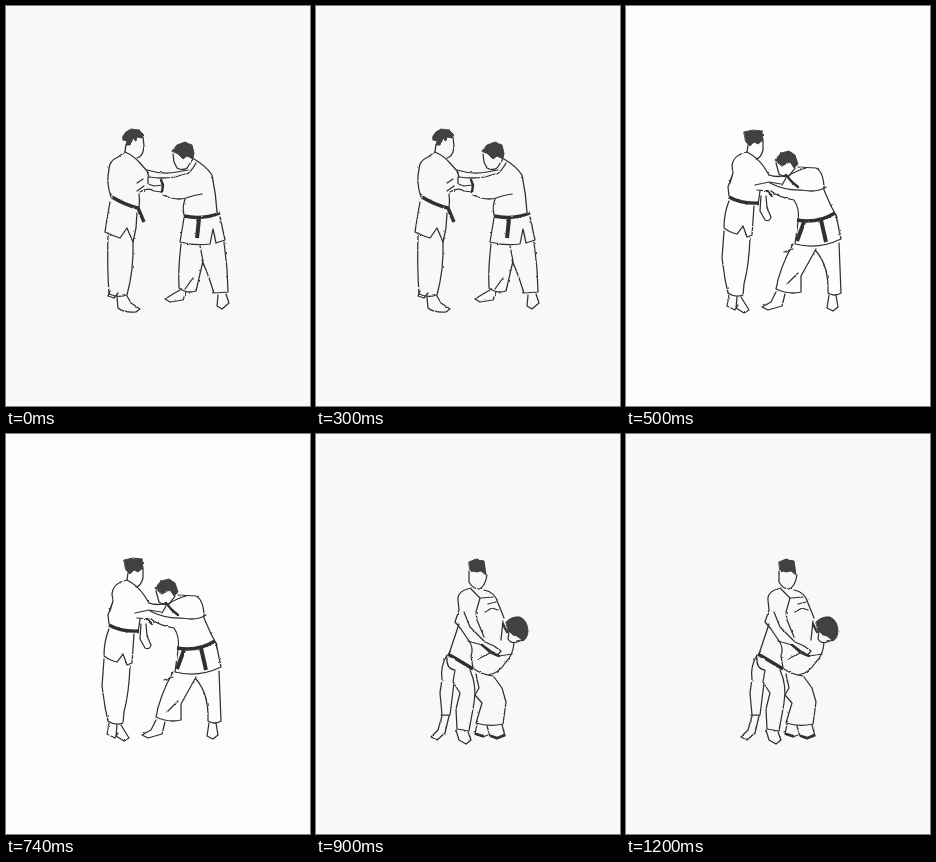
These frames come from a looping animation (304 px wide and 400 px high, 1.4 s). An HTML page:

```html
<!DOCTYPE html>
<html lang="en">
<head>
<meta charset="utf-8">
<title>Judo throw entry</title>
<style>
  html, body { margin: 0; width: 100%; height: 100%; overflow: hidden; background: #f8f8f8; }
  svg { display: block; width: 100%; height: 100%; }
  path { fill: none; stroke: #303030; stroke-width: 1.25; stroke-linecap: round; stroke-linejoin: round; }
  .hair { fill: #414141; stroke-width: .8; }
  .belt { stroke-width: 3.4; stroke-linecap: butt; }
  .knot { stroke-width: 4; stroke-linecap: butt; }
  .cuff { stroke-width: 2.4; }
  .ink { filter: url(#rough); }
  .pose { visibility: hidden; }
</style>
</head>
<body>
<svg viewBox="0 0 304 400">
  <!-- Slightly uneven pen line -->
  <filter id="rough" filterUnits="userSpaceOnUse" width="304" height="400" color-interpolation-filters="sRGB">
    <feTurbulence type="fractalNoise" baseFrequency=".22" numOctaves="2" seed="4"/>
    <feDisplacementMap in="SourceGraphic" scale="2" xChannelSelector="R" yChannelSelector="G"/>
  </filter>

  <!-- Grip -->
  <g class="pose">
    <rect width="304" height="400" fill="#f8f8f8"/>
    <g class="ink">
      <!-- left fighter -->
      <path class="hair" d="M117 130L120 126 125 123 133 124 137 128 136 132 131 131 130 135 127 133 124 139 120 139 121 135 117 134Z"/>
      <path d="M137 131L138 140 137 146Q135 151 131 152M120 139L119 146"/>
      <path d="M119 146L112 151Q103 155 103 163Q100 177 105 191M119 146Q128 150 134 157L141 165 143 171"/>
      <path d="M131 177L137 173M131 185L138 180M133 188Q134 195 133 202"/>
      <path class="belt" d="M106 191Q119 199 132 202L138 216"/>
      <path d="M104 196Q101 212 99 226Q107 230 114 232L121 222 127 236 130 222 131 207"/>
      <path d="M102 229Q101 260 103 288M127 236Q128 263 121 289M103 288Q112 292 121 289"/>
      <path d="M104 285L102 290 108 292 112 287M111 291L112 302Q118 307 130 306L134 303 125 297 121 290"/>
      <!-- arms -->
      <path d="M141 164Q157 169 171 166L182 164M143 171Q156 173 169 171L179 168"/>
      <path d="M142 171L142 178 148 180M134 186Q142 181 148 185L156 186M148 180L157 179M157 189Q170 195 180 192Q188 189 196 188"/>
      <path class="cuff" d="M155 174L157 179 156 186"/>
      <!-- right fighter -->
      <path class="hair" d="M166 145L171 139 179 136 186 139 188 147 187 153 181 150 177 153 172 148Z"/>
      <path d="M167 148L168 156 171 162Q177 165 181 162L187 153"/>
      <path d="M188 153Q200 160 206 169Q210 188 211 206M190 157Q185 166 181 168M179 193Q176 202 178 209"/>
      <path class="belt" d="M178 210Q196 214 214 207"/>
      <path class="knot" d="M193 213L191 232"/>
      <path d="M178 212L174 236Q189 240 204 238L207 223 210 237 219 234 214 211"/>
      <path d="M175 238Q172 263 173 282Q181 288 190 285L197 255 194 240M196 254Q203 270 208 287L222 286 221 263 218 236M179 283L187 272"/>
      <path d="M174 284L167 288 159 293 164 296 177 294 180 286M212 289L211 300 216 303 223 297 220 288"/>
    </g>
  </g>

  <!-- Step in -->
  <g class="pose">
    <rect width="304" height="400" fill="#fdfdfd"/>
    <g class="ink">
      <!-- left fighter -->
      <path class="hair" d="M118 126L127 124 136 125 137 134 132 138 128 136 124 140 120 136Z"/>
      <path d="M137 134L137 144Q135 152 130 153M122 139L121 146"/>
      <path d="M121 146Q107 149 106 160L107 167 102 181 103 190M121 146Q132 152 138 161L143 169M107 167L104 177"/>
      <path d="M129 179L143 176 155 178M131 184L143 185M134 185L132 199"/>
      <path class="belt" d="M103 191Q115 198 133 197"/>
      <path d="M103 195Q98 207 98 222Q105 227 111 228L117 220 121 231 126 229 128 200"/>
      <path d="M98 225L96 252 99 273 102 287M124 232Q123 259 118 278L117 289Q109 292 102 287"/>
      <path d="M103 289L101 300 109 304 112 299M111 291L110 302 118 307 123 304 115 291"/>
      <path d="M135 190L134 205 139 214Q144 216 145 211L141 202 140 190"/>
      <!-- right fighter -->
      <path class="hair" d="M149 154L155 147 163 145 169 149 172 158 168 162 164 156 156 160Z"/>
      <path d="M150 157L153 168Q158 172 163 170L169 162"/>
      <path d="M172 161L190 162Q198 166 198 184L205 200 211 211M162 170Q172 164 180 162"/>
      <path d="M143 169Q151 172 160 169M144 177Q160 185 176 184Q191 187 200 181M145 185Q152 191 168 194Q174 203 172 214M156 179L160 172"/>
      <path class="cuff" d="M160 169L166 176 172 181M141 185L146 190"/>
      <path class="belt" d="M171 214Q191 218 209 207"/>
      <path class="knot" d="M178 216L171 235M195 214L200 236"/>
      <path d="M172 216L169 238Q192 244 215 233L210 209"/>
      <path d="M167 238Q154 261 150 283Q163 289 175 286L175 270 190 243M190 245Q203 260 202 287Q209 291 215 287L213 237M158 246L167 243M161 278L172 267"/>
      <path d="M150 286L145 296 136 301 142 304 156 300 159 288M203 289L201 302 207 305 212 301 210 289"/>
    </g>
  </g>

  <!-- Hip entry -->
  <g class="pose">
    <rect width="304" height="400" fill="#f8f8f8"/>
    <g class="ink">
      <!-- upright fighter -->
      <path class="hair" d="M153 128L160 125 168 127 169 133 170 141 165 137 160 138 154 136Z"/>
      <path d="M153 137L153 148Q157 155 163 155Q169 153 171 141"/>
      <path d="M155 154Q141 157 142 166L143 176 139 188 145 195 153 207M168 156Q179 158 182 169L188 184"/>
      <path d="M155 155L164 164 160 178 161 186 168 203M165 164L177 163M169 178L176 174 182 176M172 170L180 168M148 178L154 193 168 207"/>
      <path d="M143 190L138 205 133 220M153 207Q158 214 155 222L157 234M152 207L166 211"/>
      <path class="belt" d="M132 220Q144 227 157 235"/>
      <path d="M131 221Q124 233 126 245L124 259 126 281M131 223Q130 235 139 236L137 248 144 259 140 275 141 295M154 236Q161 251 158 269L153 297 141 295M138 249L134 281 125 281"/>
      <path d="M126 282L122 296 115 303 121 306 129 299 133 282M140 296L143 306 150 310 155 306 152 298"/>
      <!-- bent fighter -->
      <path class="hair" d="M190 188Q196 182 204 183Q211 186 212 196Q212 204 207 207L201 202 197 201 192 196Z"/>
      <path d="M193 197L192 205Q195 210 201 208L207 206M187 187L185 206M198 209Q197 221 190 228Q182 240 172 241M158 235Q165 240 177 242"/>
      <path d="M166 211L174 219 181 222 185 217 178 212 169 208M183 222L196 220M162 225L174 219"/>
      <path class="cuff" d="M166 211L174 217 183 222M187 190L191 198"/>
      <path d="M160 240L163 254 159 261 166 269 160 289Q173 293 187 290L190 268 186 254 178 243"/>
      <path d="M161 290L159 300 167 303 172 301M171 292L174 302 181 305 189 302 186 291"/>
      <path class="cuff" d="M160 300L167 302M175 302L181 304 188 301"/>
    </g>
  </g>
</svg>
<script>
  const poses = document.querySelectorAll('.pose');
  const poseEnds = [500, 900, 1400];

  function draw() {
    const time = performance.now() % 1400;
    const current = poseEnds.findIndex(end => time < end);
    poses.forEach((pose, i) => { pose.style.visibility = i === current ? 'visible' : 'hidden'; });
    requestAnimationFrame(draw);
  }
  draw();
</script>
</body>
</html>
```
